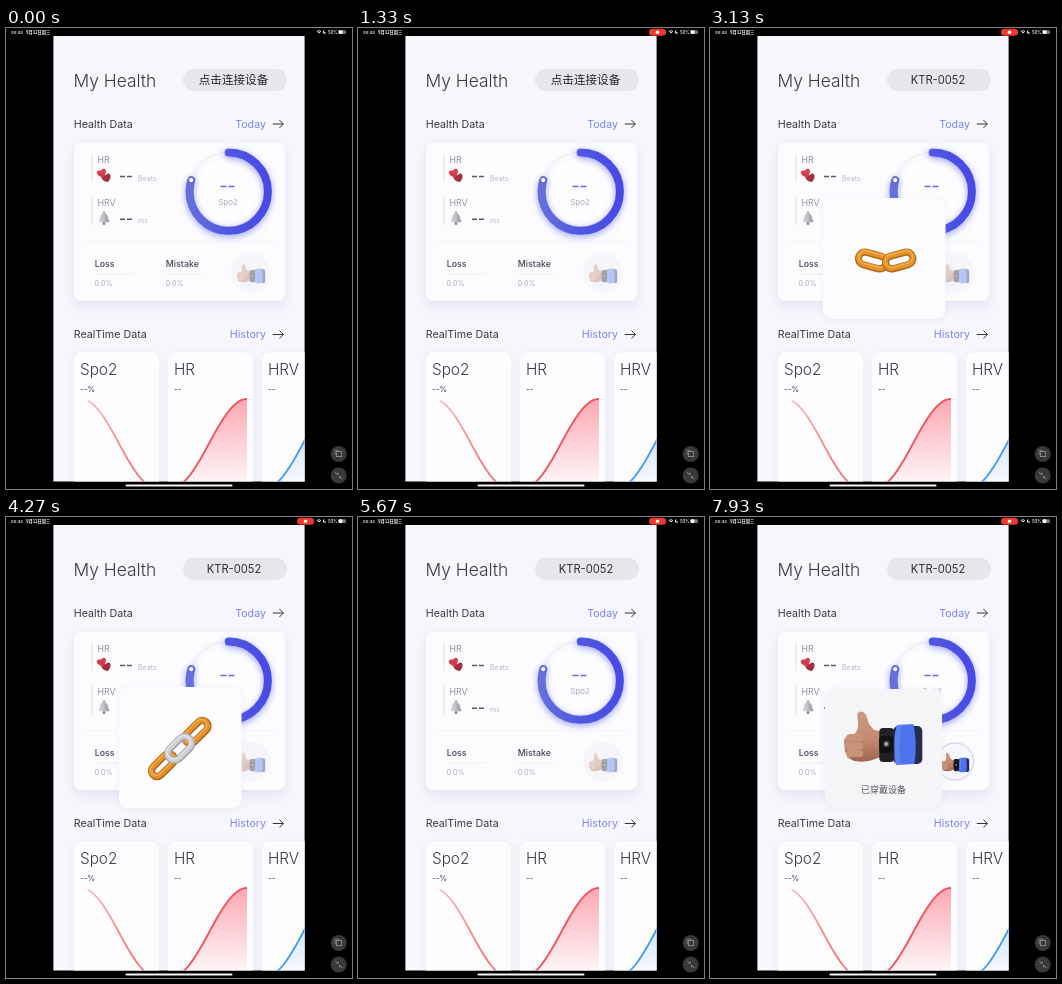
Write an HTML page with a canvas that moves like this. It is 346 by 461 pixels and loops after 8000 ms.

```html
<!DOCTYPE html>
<html lang="en">
<head>
<meta charset="utf-8">
<title>My Health</title>
<style>
html, body { margin: 0; width: 100%; height: 100%; overflow: hidden; background: #000; }
canvas { display: block; width: 100vw; height: 100vh; }
</style>
</head>
<body>
<canvas id="stage"></canvas>
<script>
const W = 346, H = 461, LOOP = 8000;
const SANS = 'Inter, "Noto Sans CJK SC", "Noto Sans CJK", sans-serif';
const CJK = '"Noto Sans CJK SC", "Noto Sans CJK", sans-serif';
const INK = '#3a384e', LINK = '#7d88e6', GREY = '#a9a9b4';
const canvas = document.getElementById('stage');
const ctx = canvas.getContext('2d');

const clamp = v => Math.max(0, Math.min(1, v));
const span = (t, a, b) => clamp((t - a) / (b - a));
const smooth = p => p * p * (3 - 2 * p);
const easeOut = p => 1 - (1 - p) ** 3;
const mix = (a, b, p) => a + (b - a) * p;

// Eased interpolation through [time, value] stops
function track(t, stops) {
  for (let i = 1; i < stops.length; i++) {
    const [t0, a] = stops[i - 1], [t1, b] = stops[i];
    if (t < t1) return mix(a, b, smooth(span(t, t0, t1)));
  }
  return stops[stops.length - 1][1];
}

function text(s, x, y, size, color, weight = 400, align = 'left', family = SANS) {
  ctx.font = `${weight} ${size}px ${family}`;
  ctx.textAlign = align;
  ctx.fillStyle = color;
  ctx.fillText(s, x, y);
}

function box(x, y, w, h, r, fill) {
  ctx.beginPath();
  ctx.roundRect(x, y, w, h, r);
  ctx.fillStyle = fill;
  ctx.fill();
}

function disc(x, y, r, fill) {
  ctx.beginPath();
  ctx.arc(x, y, r, 0, Math.PI * 2);
  ctx.fillStyle = fill;
  ctx.fill();
}

function arc(x, y, r, from, to, color, width) {
  ctx.beginPath();
  ctx.arc(x, y, r, from, to);
  ctx.strokeStyle = color;
  ctx.lineWidth = width;
  ctx.stroke();
}

function line(points, color, width = 1) {
  ctx.beginPath();
  points.forEach(([x, y]) => ctx.lineTo(x, y));
  ctx.strokeStyle = color;
  ctx.lineWidth = width;
  ctx.stroke();
}

function shape(d, fill) {
  ctx.fillStyle = fill;
  ctx.fill(new Path2D(d));
}

function at(x, y, scale, draw, angle = 0) {
  ctx.save();
  ctx.translate(x, y);
  ctx.rotate(angle);
  ctx.scale(scale, scale);
  draw();
  ctx.restore();
}

function shadowed(color, blur, dy, draw) {
  ctx.save();
  ctx.shadowColor = color;
  ctx.shadowBlur = blur * canvas.width / W;
  ctx.shadowOffsetY = dy * canvas.height / H;
  draw();
  ctx.restore();
}

function statusBar(t) {
  text('00:43', 5, 5.8, 4, '#fff', 600);
  text('9月12日周三', 20, 5.8, 4.2, '#fff', 700, 'left', CJK);
  if (t > 900) {
    box(291, 0.8, 17, 7, 3.5, '#f0382e');
    disc(299.5, 4.3, 1.8, '#fff');
  }
  for (const r of [1.6, 3.2]) arc(313, 6, r, -2.3, -0.85, '#fff', 0.9);
  disc(318.7, 4, 1.8, '#fff');
  disc(319.6, 3.3, 1.5, '#000');
  text('50%', 322, 5.8, 4.3, '#fff', 500);
  box(332.5, 2.2, 7.5, 3.8, 1.2, '#777');
  box(332.5, 2.2, 4, 3.8, 1.2, '#fff');
}

function cornerButtons() {
  for (const y of [426, 447.5]) disc(332.7, y, 8, '#39393b');
  ctx.strokeStyle = '#999';
  ctx.lineWidth = 0.8;
  ctx.strokeRect(330.3, 423.6, 5.4, 5);
  line([[329, 427], [329, 422.3], [333, 422.3]], '#999', 0.7);
  line([[329, 444], [332, 447], [332, 444.5]], '#999', 0.8);
  line([[336.5, 451], [333.5, 448], [333.5, 450.5]], '#999', 0.8);
}

function arrow(y) {
  line([[266.8, y], [277.3, y]], '#333246', 1);
  line([[273.4, y - 4], [277.4, y], [273.4, y + 4]], '#333246', 1);
}

function heading(title, link, y) {
  text(title, 67.7, y + 3.8, 10.7, INK);
  text(link, 260, y + 3.8, 10.7, LINK, 400, 'right');
  arrow(y);
}

function dashes(x, y, w, color) {
  line([[x, y], [x + w, y]], color, 1.6);
  line([[x + w + 2, y], [x + 2 * w + 2, y]], color, 1.6);
}

function heart(x, y, s, color) {
  at(x, y, s, () =>
    shape('M0 5 C-8 0 -5 -6 0 -2.5 C5 -6 8 0 0 5Z', color), -0.35);
}

function bell() {
  const g = ctx.createLinearGradient(92, 0, 104, 0);
  g.addColorStop(0, '#dededf');
  g.addColorStop(0.45, '#bfbfc4');
  g.addColorStop(1, '#8f8f97');
  disc(98, 195.5, 1.6, '#88888f');
  disc(98, 184.6, 1.3, '#a9a9af');
  shape('M92.3 194.3 C94.3 192 93 185.3 98 185.3 C103 185.3 101.7 192 103.7 194.3Z', g);
}

function ring() {
  const cx = 222.7, cy = 163.6, r = 39.2, end = Math.PI * 1.095;
  disc(cx, cy, 43, '#f8f8fd');
  disc(cx, cy, 34, '#fdfdff');
  arc(cx, cy, r, 0, Math.PI * 2, '#e9eaf5', 1);
  const g = ctx.createLinearGradient(184, 0, 262, 0);
  g.addColorStop(0, '#646ede');
  g.addColorStop(0.5, '#5057e0');
  g.addColorStop(1, '#484ae4');
  ctx.save();
  ctx.lineCap = 'round';
  shadowed('rgba(90,100,225,.6)', 7, 2, () =>
    arc(cx, cy, r, -Math.PI / 2, end, g, 8));
  ctx.restore();
  disc(cx + r * Math.cos(end), cy + r * Math.sin(end), 2.1, '#fff');
  dashes(214.5, 158.5, 6, '#6469dc');
  text('Spo2', 222, 176.7, 8, GREY, 400, 'center');
}

function thumb() {
  // Forearm centre near the origin; about 80 units wide
  const skin = ctx.createLinearGradient(0, -28, 0, 24);
  skin.addColorStop(0, '#d09a80');
  skin.addColorStop(0.55, '#c28a70');
  skin.addColorStop(1, '#9c6450');
  shape('M-28 -5 C-22 -10 -25 -18 -25 -25 C-22 -30 -16 -27 -15 -20 ' +
    'C-14 -15 -11 -12 -8 -9 L1 -7 L1 17 L-10 21 C-20 24 -32 23 -33 18 ' +
    'C-38 14 -38 10 -37 7 C-41 1 -36 -5 -28 -5Z', skin);
  for (const [y, w] of [[-1, 17], [7, 19], [14.5, 17]]) {
    box(-38 + (19 - w), y - 4, w, 8.2, 4, '#c9937a');
    line([[-35, y + 4.3], [-20, y + 4]], '#9d6855', 0.8);
  }
  box(11, -13, 29, 38, 5, '#252c4d');
  shape('M15 -14 L31 -15 C34 -3 34 13 32 25 L14 26 C10 15 11 -3 15 -14Z', '#4d74ee');
  shape('M15 -14 L20 -14.3 C16 0 17 12 19 25.7 L14 26 C10 15 11 -3 15 -14Z', '#5d82f2');
  box(-3, -11, 15, 34, 4, '#202026');
  box(-3, -3, 14, 17, 3.5, '#111116');
  disc(4, 5, 3.2, '#484a52');
  disc(4, 5, 1.4, '#d5d8df');
}

function wearBadge(worn) {
  disc(245, 244.5, 20, '#f6f6fb');
  if (worn) arc(245, 244.5, 18.5, 0, Math.PI * 2, '#c3cefa', 1);
  at(244.8, 246, 0.36, thumb);
  if (!worn) disc(245, 244.5, 20, 'rgba(245,245,250,.62)');
}

function healthCard(worn) {
  shadowed('rgba(165,170,225,.24)', 12, 5, () => box(68, 115, 211, 158, 7, '#fcfcff'));
  line([[86, 126], [86, 154]], '#dfe0ea', 0.9);
  line([[86, 169], [86, 197]], '#dfe0ea', 0.9);
  line([[76, 214], [271, 214]], '#f3f3f8', 1);
  text('HR', 91.5, 135.3, 8.8, '#92929f');
  text('HRV', 91.5, 178.3, 8.8, '#92929f');
  heart(100.4, 149.6, 0.95, '#a32f3d');
  heart(95.8, 145, 0.95, '#d43d4a');
  bell();
  dashes(114, 148.5, 5, '#555778');
  dashes(114, 191.3, 5, '#555778');
  text('Beats', 132, 152.6, 7, '#b9b9c4');
  text('ms', 132, 194.6, 7, '#b9b9c4');
  ring();
  [['Loss', 88.7], ['Mistake', 159.7]].forEach(([name, x]) => {
    text(name, x, 239, 8.9, '#45445a', 500);
    line([[x, 246], [x + 38, 246]], '#f2f2f7', 1.5);
    text('0.0%', x, 257.6, 7.2, GREY);
  });
  wearBadge(worn);
}

function curve(from, to, peak, color, fill) {
  const y = x => 415.5 - 44.5 * Math.cos(Math.PI * (x - peak) / 76);
  const path = new Path2D();
  for (let x = from; x <= to; x++) path.lineTo(x, y(x));
  if (fill) {
    const area = new Path2D(path);
    area.lineTo(to, 470);
    area.lineTo(from, 470);
    const g = ctx.createLinearGradient(0, 371, 0, 454);
    g.addColorStop(0, `rgba(${fill},.6)`);
    g.addColorStop(1, `rgba(${fill},.06)`);
    ctx.fillStyle = g;
    ctx.fill(area);
  }
  ctx.strokeStyle = color;
  ctx.lineWidth = 1.9;
  ctx.stroke(path);
}

function chartCards() {
  [['Spo2', '--%'], ['HR', '--'], ['HRV', '--']].forEach(([name, value], i) => {
    const x = 68 + 94 * i;
    shadowed('rgba(165,170,225,.17)', 8, 2, () => box(x, 324.5, 85, 150, 8, '#fdfdff'));
    text(name, x + 6, 346.8, 15.3, INK, 350);
    text(value, x + 6, 364, 8, '#3d3c4c');
  });
  const fade = ctx.createLinearGradient(80, 0, 125, 0);
  fade.addColorStop(0, 'rgba(250,130,125,.45)');
  fade.addColorStop(1, '#f4797a');
  curve(82, 150, 75, fade);
  curve(170, 241, 241, '#f0545b', '252,110,125');
  curve(262, 335, 335, '#4a98f2', '130,185,250');
}

function link(x, width, tones, tilt = 0) {
  const h = Math.max(width, 1), length = 28, [dark, base, light] = tones;
  const oval = (color, thick, dy) => {
    ctx.beginPath();
    ctx.roundRect(-length / 2, -h / 2 + dy, length, h, h / 2);
    ctx.strokeStyle = color;
    ctx.lineWidth = thick;
    ctx.stroke();
  };
  at(x, 0, 1, () => {
    oval(dark, 7.2, 0);
    oval(base, 5, -0.5);
    oval(light, 0.9, -1.5);
  }, tilt);
}

const ORANGE = ['#b5691a', '#e3942e', '#f7bb5c'];
const STEEL = ['#a4a4ab', '#cfcfd4', '#f0f0f3'];

function chain(t) {
  const angle = track(t, [[2500, -0.6], [3130, 0], [4270, -0.78], [4930, 0]]);
  const roll = track(t, [[2500, 0.9], [3130, 0.85], [4270, 0.95], [4930, 0]]);
  // 1 while the two outer links lie folded over each other
  const fold = track(t, [[2500, 0], [3130, 1], [3550, 0]]);
  const gap = mix(23.5, 13.5, fold), tilt = 0.26 * fold;
  const wide = 19.5 * Math.cos(roll), edge = 17 * Math.sin(roll);
  at(173.7 + 2 * fold, 231.5 + fold, 1, () => {
    link(-gap, wide, ORANGE, tilt);
    link(gap, wide, ORANGE, -tilt);
    ctx.save();
    ctx.globalAlpha = 1 - fold;
    link(0, edge, STEEL);
    ctx.restore();
  }, angle);
}

function popup(x, y, w, h, fill, shift, content) {
  ctx.save();
  ctx.translate(0, shift);
  shadowed('rgba(150,150,190,.13)', 7, 1, () => box(x, y, w, h, 9, fill));
  content();
  ctx.restore();
}

function popups(t) {
  if (t > 2350 && t < 5065) {
    const rise = 1 - easeOut(span(t, 2350, 2750));
    const fall = span(t, 4732, 5065) ** 2;
    popup(113, 170, 122.5, 121, '#fcfcfe', 300 * (rise + fall), () => chain(t));
  }
  if (t > 7400) {
    const rise = 1 - easeOut(span(t, 7400, 7830));
    popup(115, 172, 117, 118, '#f5f4f6', 300 * rise, () => {
      at(172.3, 222, 1, thumb);
      text('已穿戴设备', 173.5, 275.6, 9, '#55555d', 400, 'center', CJK);
    });
  }
}

function app(t) {
  ctx.save();
  ctx.beginPath();
  ctx.rect(47.4, 8, 251.2, 445.6);
  ctx.clip();
  ctx.fillStyle = '#f6f6fc';
  ctx.fillRect(47, 7, 252, 448);
  text('My Health', 67.5, 58.6, 17.4, INK, 350);
  box(177, 41, 104, 22, 11, '#e7e7eb');
  if (t < 2300) text('点击连接设备', 227.5, 56.2, 11.6, '#24242a', 400, 'center', CJK);
  else text('KTR-0052', 228, 56, 11.2, '#2e2e36', 400, 'center');
  heading('Health Data', 'Today', 96);
  healthCard(t > 7400);
  heading('RealTime Data', 'History', 306.5);
  chartCards();
  popups(t);
  ctx.restore();
}

function render(t) {
  ctx.setTransform(canvas.width / W, 0, 0, canvas.height / H, 0, 0);
  ctx.fillStyle = '#000';
  ctx.fillRect(0, 0, W, H);
  statusBar(t);
  app(t);
  cornerButtons();
  box(119.5, 456.5, 107, 2, 1, '#f4f4f4');
}

function resize() {
  const d = window.devicePixelRatio || 1;
  canvas.width = Math.round(innerWidth * d);
  canvas.height = Math.round(innerHeight * d);
}

function tick() {
  render(performance.now() % LOOP);
  requestAnimationFrame(tick);
}

addEventListener('resize', resize);
resize();
tick();
</script>
</body>
</html>
```
